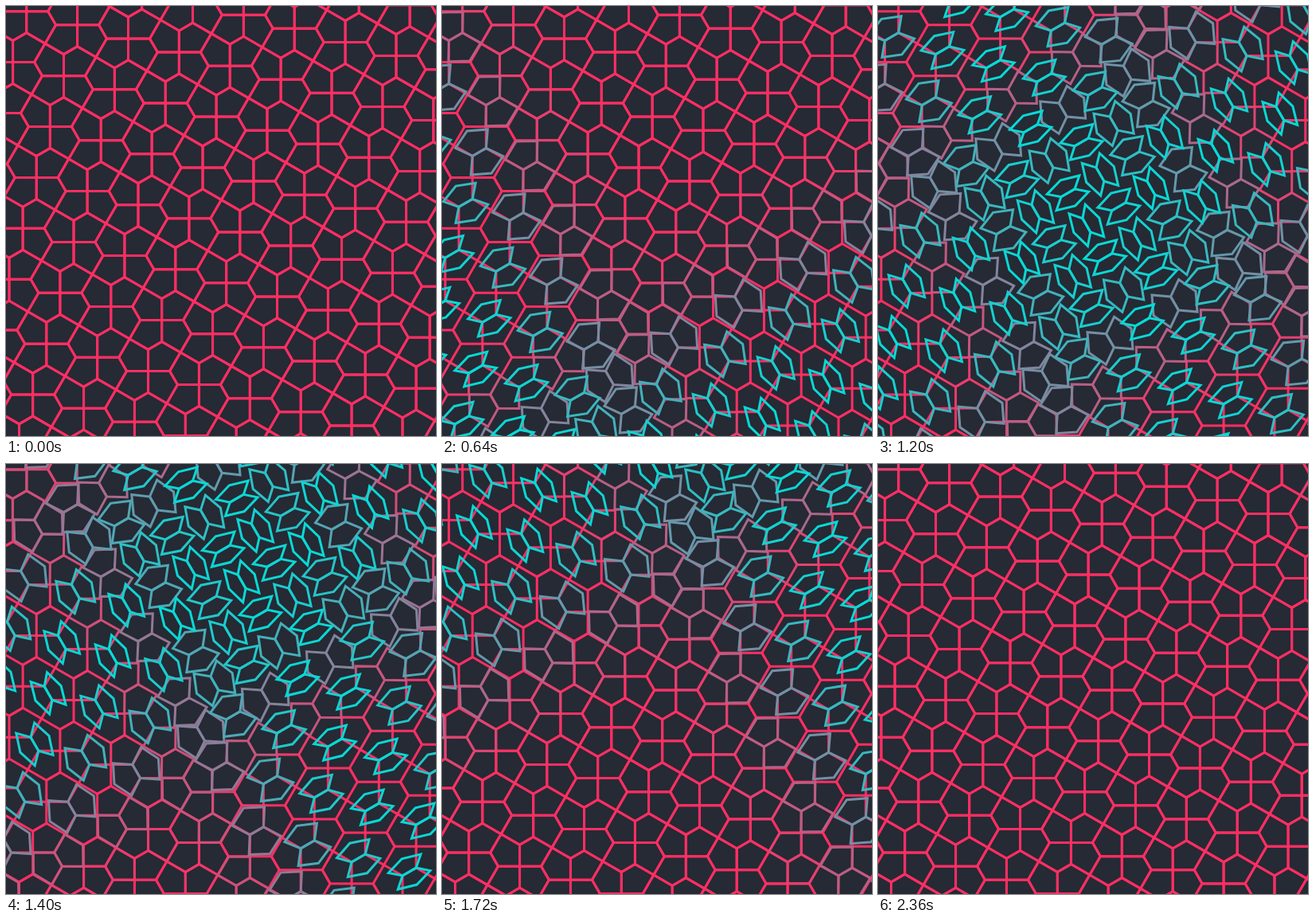
An HTML page with a canvas that plays this animation: 540 px wide and 540 px high, repeating every 2.4 s.

```html
<!DOCTYPE html>
<html>
<head>
<meta charset="utf-8">
<style>
html, body { margin: 0; overflow: hidden; background: #252a34; }
canvas { display: block; }
</style>
</head>
<body>
<canvas id="stage" width="540" height="540"></canvas>
<script>
const ctx = document.getElementById('stage').getContext('2d');
const LOOP = 2400, SIDE = 27, STEP = SIDE * Math.sqrt(6), TILT = Math.PI / 12;
const CENTER = 270.4, DELAY = 1.92, HALF = 580, FOLD = Math.PI / 3;
const RED = [255, 46, 99], CYAN = [8, 217, 214];

// Half a pair of pentagons: x runs along the shared short edge, y away from it.
const tip = SIDE * (Math.sqrt(3) - 1) / 2, corner = tip + SIDE / 2, apex = corner + SIDE / 2;
const PENTAGON = [[-tip, 0], [-corner, corner], [0, apex], [corner, corner], [tip, 0]];

// Each pair peaks when the wave travelling along its short edge reaches it.
const pairs = [];
function addPair(x, y, angle, heading) {
  const peak = LOOP / 2 + DELAY * (x * Math.cos(heading) + y * Math.sin(heading));
  pairs.push({ x: x + CENTER, y: y + CENTER, angle, peak });
}
const ux = STEP * Math.cos(TILT), uy = STEP * Math.sin(TILT);
for (let i = -7; i <= 7; i++) {
  for (let j = -7; j <= 7; j++) {
    const x = i * ux - j * uy, y = i * uy + j * ux;
    if (Math.max(Math.abs(x), Math.abs(y)) > 350) continue;
    addPair(x + 31.94, y - 18.44, -Math.PI / 6, -Math.PI / 6);
    addPair(x - 8.56, y + 4.94, Math.PI / 3, -2 * Math.PI / 3);
  }
}

const ease = p => p < 0.5 ? 2 * p * p : 1 - 2 * (1 - p) ** 2;
const foldAt = (peak, time) => ease(Math.max(0, 1 - Math.abs(time - peak) / HALF));

function drawPair({ x, y, angle, fold }) {
  const cos = Math.cos(angle), sin = Math.sin(angle), squash = Math.cos(FOLD * fold);
  const color = RED.map((c, i) => Math.round(c + (CYAN[i] - c) * fold));
  ctx.strokeStyle = `rgb(${color})`;
  for (const side of [1, -1]) {
    ctx.beginPath();
    for (const [px, py] of PENTAGON) {
      const a = px * side, b = py * side * squash;
      ctx.lineTo(x + a * cos - b * sin, y + a * sin + b * cos);
    }
    ctx.closePath();
    ctx.stroke();
  }
}

function draw(now) {
  const time = now % LOOP;
  ctx.fillStyle = '#252a34';
  ctx.fillRect(0, 0, 540, 540);
  ctx.lineWidth = 3;
  for (const pair of pairs) pair.fold = foldAt(pair.peak, time);
  pairs.sort((p, q) => p.fold - q.fold);
  pairs.forEach(drawPair);
  requestAnimationFrame(draw);
}
requestAnimationFrame(draw);
</script>
</body>
</html>
```
